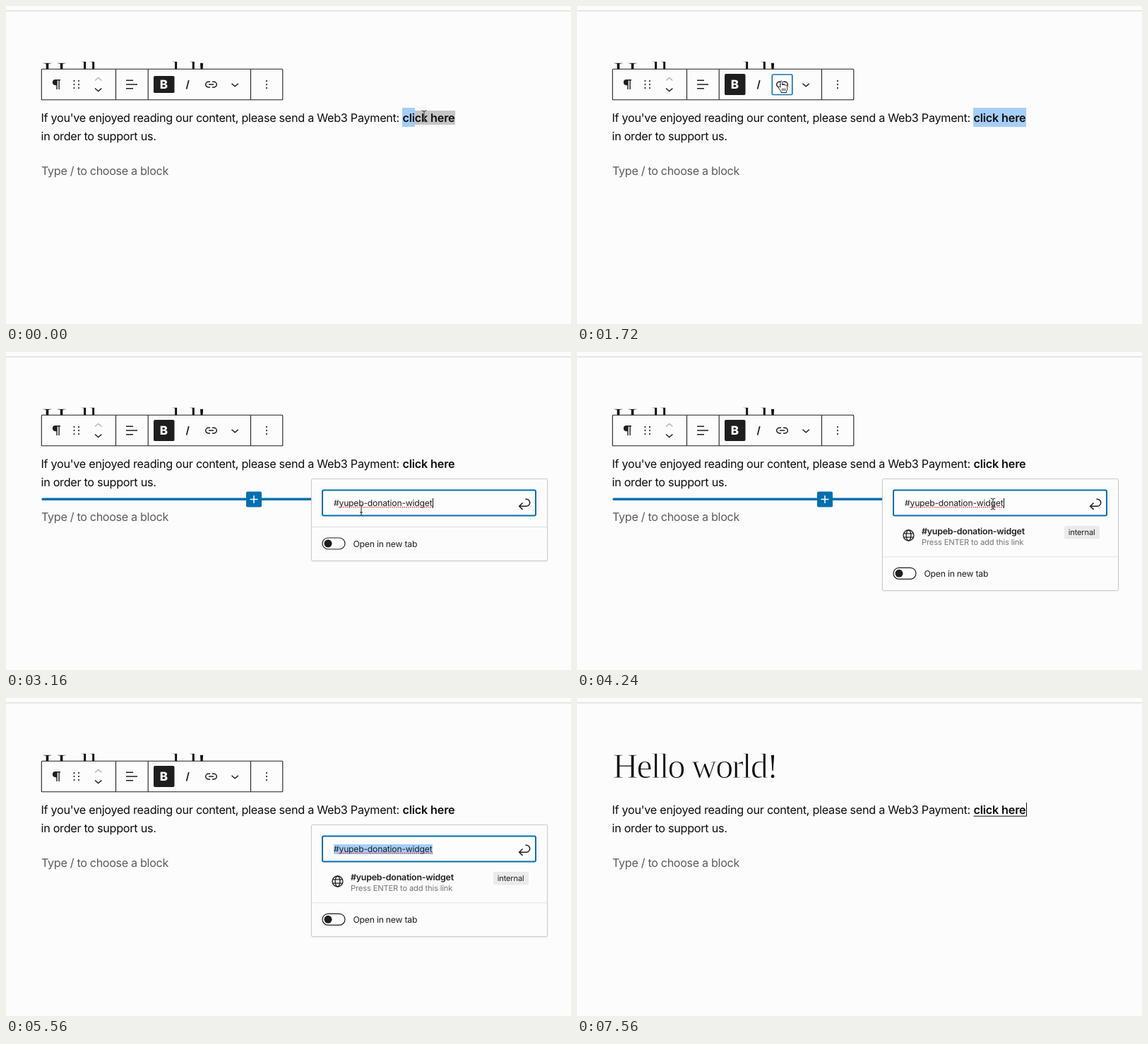
An HTML page for the animation above (7.84 s loop, 800 px wide and 450 px high).

```html
<!DOCTYPE html>
<html lang="en">
<head>
<meta charset="utf-8">
<title>Adding a link</title>
<style>
  :root { --ink: #1e1e1e; --blue: #006fb0; --mark: #a6cefb; --page: #fcfcfc; }
  html, body { margin: 0; width: 100%; height: 100%; overflow: hidden; background: var(--page); }
  svg { display: block; width: 800px; height: 450px; }
  text { font-family: Inter, "Open Sans", sans-serif; text-rendering: geometricPrecision; fill: var(--ink); white-space: pre; }

  .body { font-size: 16.2px; letter-spacing: -.0175em; fill: #0c0c0c; }
  .bold { font-weight: 600; letter-spacing: -.011em; }
  .hint { letter-spacing: -.0215em; fill: #5c5c5c; }
  /* A page-coloured outline thins the strokes to a light weight */
  .title { font: 50px "Liberation Serif", serif; letter-spacing: -.04em; fill: #0c0c0c; stroke: var(--page); stroke-width: 1.1; }
  .ui { font-size: 12.2px; letter-spacing: -.018em; }
  .name { font-size: 12.4px; font-weight: 600; letter-spacing: -.018em; }
  .note { font-size: 11.2px; letter-spacing: -.015em; fill: #757575; }
  .tag { font-size: 11.1px; letter-spacing: -.015em; }
  .suggest text.name, .suggest text.tag { fill: currentColor; }
  .line { fill: none; stroke: var(--ink); stroke-width: 1.5; }
  .solid { fill: var(--ink); }
  .page { fill: var(--page); }
  .blue { fill: var(--blue); }
  .select { fill: var(--mark); }

  /* One shared 7.84 s clock; hard switches by default */
  .a { animation: 7.84s step-end infinite; }
  .boundary { animation-name: boundary; }
  .mark { animation-name: mark; transform-origin: 561px 0; }
  .pressed { animation-name: pressed; transform-origin: 0 111px; }
  .focus { animation-name: focus; }
  .bar { animation-name: bar; }
  .insert { animation-name: insert; animation-timing-function: linear; transform-origin: 351px 208px; }
  .popover { animation-name: popover; }
  .frame { animation-name: frame; height: 116px; }
  .lower { animation-name: lower; }
  .suggest { animation-name: suggest; color: var(--ink); }
  .hover { animation-name: hover; }
  .badge { animation-name: badge; fill: #ebebeb; }
  .empty { animation-name: empty; }
  .filled { animation-name: filled; }
  .caret { animation-name: caret; }
  .picked { animation-name: picked; }
  .linked { animation-name: linked; }
  .cursor { animation-name: move; animation-timing-function: ease-in-out; }
  .beam { animation-name: beam; filter: drop-shadow(0 0 .6px #fff); }
  .hand { animation-name: hand; }

  @keyframes boundary { 0% { opacity: 1 } 6.1% { opacity: 0 } }
  @keyframes mark {
    0% { transform: scaleX(.24); opacity: 1 }
    1% { transform: scaleX(.36) }
    2% { transform: scaleX(.49) }
    3% { transform: scaleX(.67) }
    4.1% { transform: scaleX(.8) }
    5.1% { transform: scaleX(.88) }
    6.1% { transform: none; opacity: 1 }
    25% { opacity: 0; transform: none }
  }
  @keyframes pressed { 0% { transform: scaleY(.8) } 6.1% { transform: none } }
  @keyframes focus { 0% { opacity: 0 } 21.4% { opacity: 1 } 25% { opacity: 0 } }
  @keyframes bar { 0% { opacity: 1 } 92.8% { opacity: 0 } }
  @keyframes insert {
    0%, 30.6% { opacity: 0; transform: scaleX(.6) }
    32.6%, 66.3% { opacity: 1; transform: none }
    67.3%, 100% { opacity: 0; transform: none }
  }
  @keyframes popover { 0% { opacity: 0 } 25% { opacity: 1 } 89.8% { opacity: 0 } }
  @keyframes frame { 0% { height: 116px } 41.3% { height: 158px } }
  @keyframes lower { 0% { transform: none } 41.3% { transform: translateY(42.3px) } }
  @keyframes suggest { 0% { opacity: 0 } 41.3% { opacity: 1; color: var(--ink) } 82.4% { opacity: 1; color: var(--blue) } }
  @keyframes hover { 0% { opacity: 0 } 82.4% { opacity: 1 } }
  @keyframes badge { 0% { fill: #ebebeb } 82.4% { fill: #fff } }
  @keyframes empty { 0% { opacity: 1 } 35.2% { opacity: 0 } }
  @keyframes filled { 0% { opacity: 0 } 35.2% { opacity: 1 } }
  @keyframes caret { 0% { transform: translateX(-140px); opacity: 1 } 35.2% { transform: none; opacity: 1 } 66.3% { opacity: 0 } }
  @keyframes picked { 0% { opacity: 0 } 66.3% { opacity: 1 } }
  @keyframes linked { 0% { opacity: 0 } 89.8% { opacity: 1 } }
  @keyframes move {
    0% { transform: translate(592px, 156px) }
    6.4% { transform: translate(640px, 158px) }
    11.5% { transform: translate(642px, 157px) }
    19.9%, 24.2% { transform: translate(291px, 114px) }
    33.2%, 42.1% { transform: translate(503px, 224px) }
    51%, 76% { transform: translate(589px, 215px) }
    84.2%, 100% { transform: translate(647px, 252.5px) }
  }
  @keyframes beam {
    0% { opacity: 1 } 16.8% { opacity: 0 } 26.7% { opacity: 1 }
    67.3% { opacity: 0 } 76% { opacity: 1 } 82.4% { opacity: 0 }
  }
  @keyframes hand {
    0% { opacity: 0 } 16.8% { opacity: 1 } 26.7% { opacity: 0 }
    82.4% { opacity: 1 } 92.8% { opacity: 0 }
  }
</style>
</head>
<body>
<svg viewBox="0 0 800 450">
  <rect class="page" width="800" height="450"/>
  <rect y="6" width="800" height="1.6" fill="#e1e1e1"/>

  <!-- Post -->
  <text class="title" x="50.5" y="112.5">Hello world!</text>
  <rect class="a boundary" x="561" y="148" width="75" height="20" fill="#c5c5c5"/>
  <rect class="a mark select" x="561" y="144" width="75" height="27"/>
  <text class="body" x="49.5" y="164">If you've enjoyed reading our content, please send a Web3 Payment:</text>
  <text class="body bold" x="561.5" y="164">click here</text>
  <text class="body" x="49.5" y="190">in order to support us.</text>
  <text class="body hint" x="50" y="239">Type / to choose a block</text>
  <path class="a linked" d="M561.5 167.2H636.5V148" fill="none" stroke="#111"/>

  <!-- Toolbar -->
  <g class="a bar">
    <rect class="page" x="50.3" y="89.3" width="341.5" height="43.4" rx="1" stroke="#1e1e1e" stroke-width="1.1"/>
    <path class="line" style="stroke-width:1.1" d="M155.5 89.5v43M201.2 89.5v43M346.5 89.5v43"/>
    <path class="solid" d="M77 104H70a4.1 4.1 0 0 0 0 8.2h1.3V118h1.4V105.4h1.7V118h1.4V105.4H77Z"/>
    <path class="line" style="stroke-width:2.2;stroke-linecap:round" d="M96.5 106h0M103 106h0M96.5 111h0M103 111h0M96.5 116h0M103 116h0M369 106h0M369 111h0M369 116h0"/>
    <path class="line" style="stroke:#b5b5b5" d="M126 105.5l4.7-4 4.7 4"/>
    <path class="line" d="M126 116.5l4.7 4 4.7-4M319.5 109.7l4.7 4 4.7-4"/>
    <path class="line" d="M170 105.3h10M170 111h16M170 116.8h10"/>
    <rect class="a pressed solid" x="209" y="96" width="29.5" height="30" rx="2"/>
    <text x="223.3" y="117" text-anchor="middle" style="font-size:17px;font-weight:800;fill:#fff">B</text>
    <path class="line" style="stroke-width:1.7" d="M258.8 105l-3.2 12.5"/>
    <path class="line" d="M289 107.3h-2.5a3.8 3.8 0 0 0 0 7.6H289M292 107.3h2.5a3.8 3.8 0 0 1 0 7.6H292M287 111.1h7"/>
    <rect class="a focus" x="276.3" y="97" width="28.5" height="28.5" rx="1.5" fill="none" stroke="#1875b5" stroke-width="1.7"/>
  </g>

  <!-- Block inserter -->
  <g class="a insert">
    <rect class="blue" x="50.5" y="206.5" width="601" height="3.6" rx="1.5"/>
    <rect class="blue" x="340" y="197.5" width="22" height="22" rx="2"/>
    <path d="M345.5 208.5h11M351 203v11" stroke="#fff" stroke-width="1.5"/>
  </g>

  <!-- Link popover -->
  <g class="a popover">
    <rect class="a frame page" x="432.5" y="179.5" width="334" rx="1.5" stroke="#cacaca" style="filter:drop-shadow(0 1px 1px #0001)"/>
    <rect x="448" y="195.5" width="302" height="36" rx="2" fill="#fdfdfd" stroke="#006fb0" stroke-width="2"/>
    <rect class="a picked select" x="464" y="207" width="140" height="14"/>
    <text class="a empty ui" x="464" y="218" style="fill:#757575">Search or type url</text>
    <g class="a filled">
      <text class="ui" x="464" y="218">#yupeb-donation-widget</text>
      <path d="M472 219.6H604" stroke="#e8473f" stroke-width="1.7" stroke-linecap="round" stroke-dasharray="0 2.8"/>
    </g>
    <path class="a caret" d="M604.5 207v13.5" stroke="#111"/>
    <path class="line" d="M735.5 208.2h1.2a5 5 0 0 1 0 10H727M731.5 213.5l-4.8 4.7 4.8 4.7"/>

    <g class="a suggest">
      <rect class="a hover" x="447.5" y="241" width="304" height="40.5" rx="2" fill="#eaeaea"/>
      <g fill="none" stroke="currentColor" stroke-width="1.3">
        <circle cx="469.5" cy="259.5" r="7.5"/>
        <ellipse cx="469.5" cy="259.5" rx="3.4" ry="7.5"/>
        <path d="M462.8 256.8h13.4M462.8 262.2h13.4"/>
      </g>
      <text class="name" x="488" y="258">#yupeb-donation-widget</text>
      <text class="note" x="488" y="273">Press ENTER to add this link</text>
      <rect class="a badge" x="690" y="246" width="50" height="18.5" rx="2"/>
      <text class="tag" x="695.8" y="259.3">internal</text>
    </g>

    <g class="a lower">
      <path d="M433 247.5H766" stroke="#dcdcdc"/>
      <rect x="448" y="263" width="32" height="16" rx="8" fill="#fdfdfd" stroke="#1e1e1e" stroke-width="1.2"/>
      <circle class="solid" cx="456" cy="271" r="5.5"/>
      <text class="ui" x="491.5" y="275.7">Open in new tab</text>
    </g>
  </g>

  <!-- Pointer -->
  <g class="a cursor" stroke="#222">
    <path class="a beam" fill="none" d="M-3.3-8Q0-8 0-6V6Q0 8-3.3 8M3.3-8Q0-8 0-6M3.3 8Q0 8 0 6M-2 3h4"/>
    <g class="a hand" stroke-linejoin="round">
      <path fill="#fff" d="M-3-6.5a1.4 1.4 0 0 1 2.8 0V-2a1.3 1.3 0 0 1 2.5 0a1.3 1.3 0 0 1 2.4.5a1.2 1.2 0 0 1 2 .8V3q0 2-1.2 3.5V8.5H-2V7L-5.6 2q-.9-1.5.3-2t2.3 1.2Z"/>
      <path stroke-width=".9" d="M-.4 2.5v3.5M1.7 2.5v3.5M3.8 2.5v3.5"/>
    </g>
  </g>
</svg>
</body>
</html>
```
